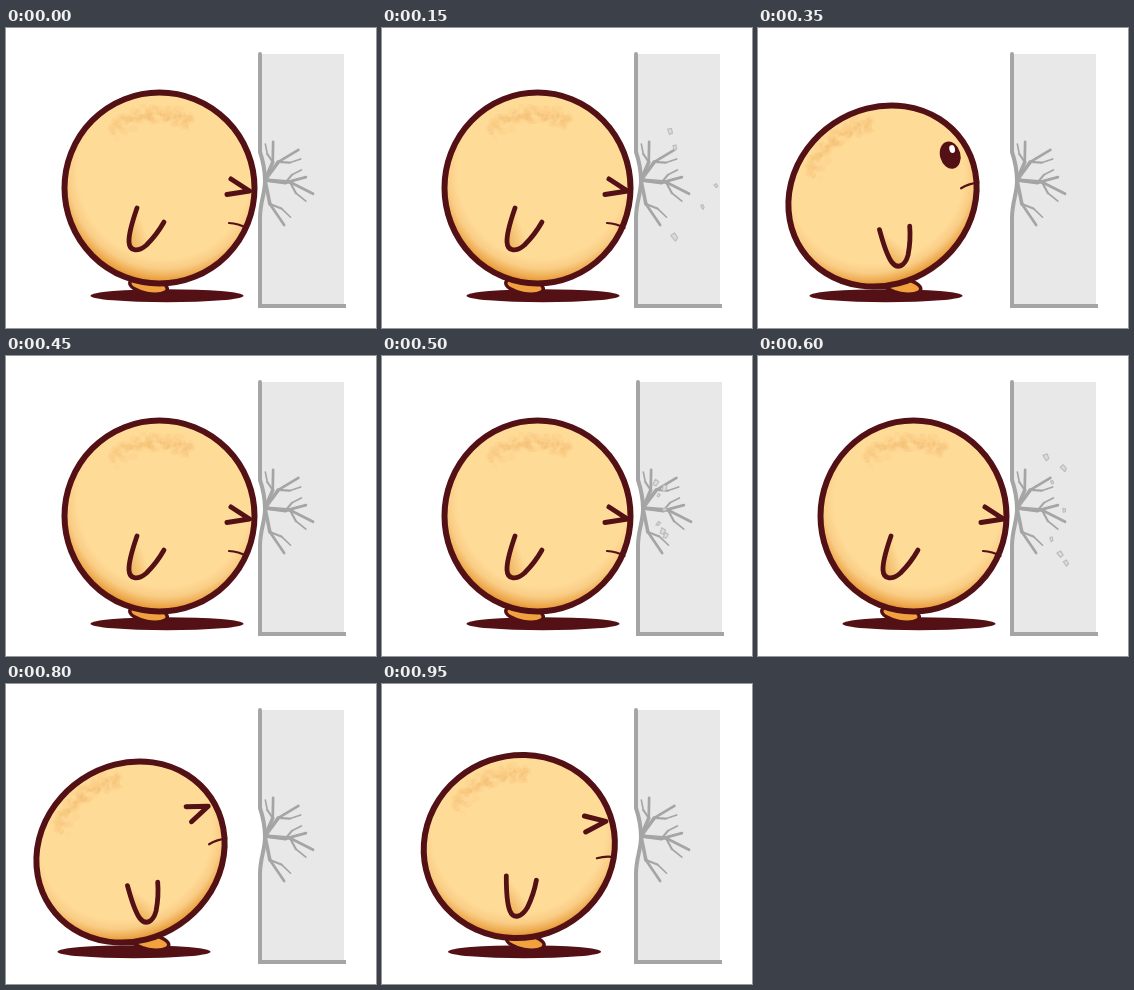
An HTML page with a canvas that plays this animation: 370x300 px, repeating every 1000 ms.

```html
<!DOCTYPE html>
<html lang="en">
<head>
<meta charset="utf-8">
<title>Head against the wall</title>
<style>
html, body { margin: 0; width: 100%; height: 100%; overflow: hidden; background: #fff; }
canvas { display: block; }
</style>
</head>
<body>
<canvas id="stage" width="370" height="300"></canvas>
<script>
const ctx = document.getElementById('stage').getContext('2d');
const INK = '#541115', SKIN = '#ffdb98', GREY = '#a5a5a5';
const LOOP = 1000, STEP = 50, SECOND_HIT = 450;
const PRESS = 150, PULL = 200, STRIKE = 100; // ms pressed on the wall, leaning back, striking
const TAU = Math.PI * 2;
const DENT = { x: 259, y: 152 };

function random(seed) {
  return (min, max) => {
    seed = seed * 16807 % 2147483647;
    return min + (max - min) * seed / 2147483647;
  };
}

function stroke(width, color) {
  ctx.lineWidth = width;
  ctx.strokeStyle = color;
  ctx.stroke();
}

function line(points, width, color) {
  ctx.beginPath();
  for (const [x, y] of points) ctx.lineTo(x, y);
  stroke(width, color);
}

function oval(x, y, rx, ry, color, turn = 0) {
  ctx.beginPath();
  ctx.ellipse(x, y, rx, ry, turn, 0, TAU);
  ctx.fillStyle = color;
  ctx.fill();
}

// A kinked branch that thins out and throws a twig to the side it bends to.
function branch(x, y, angle, length, width, side) {
  const at = (ox, oy, a, r) => [ox + Math.cos(a) * r, oy + Math.sin(a) * r];
  const tip = at(x, y, angle, length);
  const knee = at(x, y, angle - side * .2, length * .5);
  line([[x, y], knee], width, GREY);
  line([knee, tip], width * .75, GREY);
  if (width > 2.5) branch(...knee, angle + side * .6, length * .5, width * .6, -side);
}

function drawCracks() {
  const fan = [[-78, 39], [-42, 45], [-4, 41], [16, 50], [67, 49]];
  fan.forEach(([deg, length], i) =>
    branch(DENT.x, DENT.y, deg * Math.PI / 180, length, 3.6, i % 2 ? 1 : -1));
}

function drawWall(shake) {
  ctx.save();
  ctx.translate(shake, 0);
  const edge = () => {
    ctx.beginPath();
    ctx.moveTo(254, 26);
    ctx.lineTo(254, 124);
    ctx.bezierCurveTo(257, 133, 259, 142, 259, 153);
    ctx.bezierCurveTo(259, 166, 254, 174, 254, 190);
    ctx.lineTo(254, 278);
  };
  edge();
  ctx.lineTo(338, 278);
  ctx.lineTo(338, 26);
  ctx.fillStyle = '#e8e8e8';
  ctx.fill();
  edge();
  stroke(4, GREY);
  ctx.fillStyle = GREY;
  ctx.fillRect(252, 276, 88, 4);
  drawCracks();
  ctx.restore();
}

function drawChips(seed, count, age) {
  const rand = random(seed);
  const flight = 1 - (1 - age / PRESS) ** 1.7;
  for (let i = 0; i < count; i++) {
    const x = rand(288, 338), y = 85 + 140 * (i + rand(0, 1)) / count;
    const w = rand(1.5, 3), h = w * rand(1, 1.6);
    ctx.save();
    ctx.translate(DENT.x + (x - DENT.x) * flight, DENT.y + (y - DENT.y) * flight);
    ctx.rotate(rand(-.5, .5) + 2 * (1 - flight));
    ctx.beginPath();
    ctx.moveTo(-w, -h * .6);
    ctx.lineTo(w * .4, -h);
    ctx.lineTo(w, h * .4);
    ctx.lineTo(0, h);
    ctx.closePath();
    ctx.fillStyle = '#dcdcdc';
    ctx.fill();
    stroke(1.2, '#bdbdbd');
    ctx.restore();
  }
}

function drawFoot(lean) {
  oval(142.5 + 1.5 * lean, 258, 19, 7.5, '#f0a23f', .18);
  stroke(3.5, INK);
}

function drawSkin(rx, ry) {
  ctx.save();
  ctx.scale(rx, ry);
  const shade = ctx.createRadialGradient(.05, -.17, 0, .05, -.17, 1.18);
  shade.addColorStop(.77, SKIN);
  shade.addColorStop(.86, '#f9cd85');
  shade.addColorStop(.93, '#efae55');
  shade.addColorStop(.98, '#e7942f');
  oval(0, 0, 1, 1, shade);
  ctx.restore();
  ctx.beginPath();
  ctx.ellipse(0, 0, rx, ry, 0, 0, TAU);
  stroke(6, INK);
}

// Toasted patch on top of the head
function drawToast() {
  const rand = random(11);
  for (let i = 0; i < 130; i++) {
    const angle = rand(-2.28, -1.1), r = rand(64, 75) + rand(0, 9);
    const size = rand(1.5, 5);
    oval(Math.cos(angle) * r, Math.sin(angle) * r, size, size * .8,
      `rgba(232,160,75,${rand(.02, .1)})`);
  }
}

function drawFace(open) {
  if (open) {
    oval(79, 1.5, 10.2, 13.8, INK, .33);
    oval(84, -2.5, 2.8, 4, '#fff', .33);
  } else {
    line([[71.5, -9], [90, 3], [67.5, 6.5]], 5, INK);
  }
  ctx.beginPath();
  ctx.moveTo(69.5, 35);
  ctx.quadraticCurveTo(79, 35.5, 87, 40);
  stroke(2.2, INK);
}

function drawArm() {
  ctx.beginPath();
  ctx.moveTo(-22.5, 20);
  ctx.bezierCurveTo(-27, 33, -31, 45, -30.5, 54);
  ctx.bezierCurveTo(-30, 64, -21, 64, -13, 57);
  ctx.bezierCurveTo(-6, 50, 0, 42, 4.5, 34);
  const shade = ctx.createLinearGradient(-31, 48, -14, 42);
  shade.addColorStop(0, '#eeb560');
  shade.addColorStop(1, SKIN);
  ctx.fillStyle = shade;
  ctx.fill();
  stroke(4.8, INK);
}

function drawBody(lean, squash, open) {
  ctx.save();
  ctx.translate(153.5 - 29 * lean + 2 * squash, 160 + 8 * lean * lean);
  ctx.rotate(-34 * lean * Math.PI / 180);
  drawSkin(95 + 2 * lean - 2 * squash, 95.5 - 8 * lean);
  drawToast();
  ctx.translate(0, 2.5 * lean);
  drawFace(open);
  ctx.translate(1.2 * lean, 3.7 * lean);
  drawArm();
  ctx.restore();
}

// 0 touches the wall, 1 leans back fully; ease out, then strike.
function leanAt(age, left) {
  const pull = Math.min(1, Math.max(0, (age - PRESS) / PULL));
  const strike = Math.min(1, left / STRIKE) ** .84;
  return Math.min(Math.sin(pull * Math.PI / 2), strike);
}

function draw(now) {
  const t = Math.floor(now % LOOP / STEP) * STEP;
  const second = t >= SECOND_HIT;
  const age = second ? t - SECOND_HIT : t;
  const left = (second ? LOOP : SECOND_HIT) - t;
  const lean = leanAt(age, left);
  const impact = age > 0 && age <= PRESS;
  const open = !second && lean > .9;

  ctx.fillStyle = '#fff';
  ctx.fillRect(0, 0, 370, 300);
  ctx.lineCap = ctx.lineJoin = 'round';
  drawWall(impact && age < PRESS ? 2 : 0);
  if (impact) drawChips(second ? 29 : 5, second ? 7 : 5, age);
  oval(161 - 33 * lean, 267.7, 76.5, 6.5, INK);
  drawFoot(lean);
  drawBody(lean, impact ? 1 : 0, open);
}

const start = performance.now();
function tick() {
  draw(performance.now() - start);
  requestAnimationFrame(tick);
}
tick();
</script>
</body>
</html>
```
